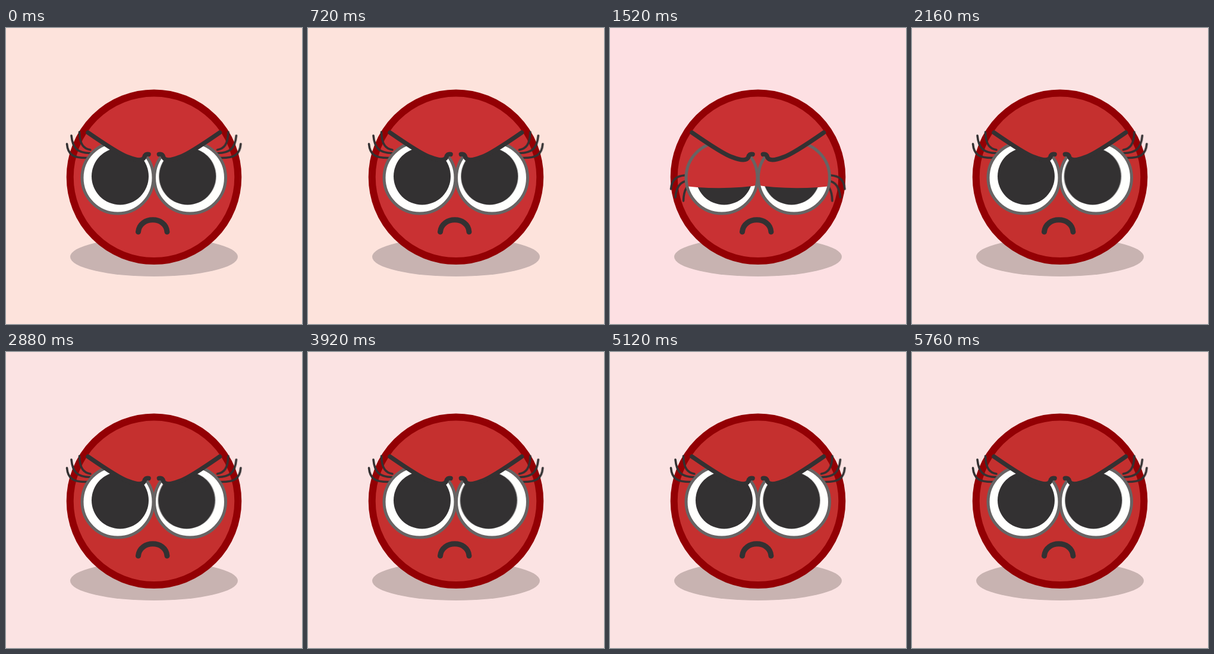
These frames come from a looping animation (498x498 px, 5840 ms). An HTML page without scripts:

```html
<!DOCTYPE html>
<html lang="en">
<head>
<meta charset="utf-8">
<title>Grumpy ball</title>
<style>
  html, body { margin: 0; width: 100%; height: 100%; overflow: hidden; }
  svg { display: block; width: 100vw; height: 100vh; }

  .bg, .skin, .lid, .lashes, .drift { animation: 5840ms step-end infinite; }
  .bg { animation-name: tint; }
  .skin { animation-name: skin; }
  .lid { animation-name: lid; }
  .lashes { animation-name: lashes; }
  .drift { animation-name: drift; }
  .line { fill: none; stroke: #333132; stroke-linecap: round; stroke-linejoin: round; }

  @keyframes tint {
    0% { fill: #fde3dc; }
    24.65%, 68.49% { fill: #fde0e3; }
    30.13%, 73.97%, 100% { fill: #fbe3e3; }
  }
  @keyframes skin {
    0% { fill: #c93133; }
    30.13%, 100% { fill: #c5302f; }
  }
  /* Two quick blinks: half way, down, half way, open. */
  @keyframes lid {
    0%, 30.13%, 73.97%, 100% { transform: translateY(-100px); }
    24.65%, 28.76%, 68.49%, 72.6% { transform: translateY(-45px); }
    26.02%, 69.86% { transform: translateY(0); }
  }
  @keyframes lashes {
    0%, 30.13%, 73.97%, 100% { transform: none; }
    24.65%, 28.76%, 68.49%, 72.6% { transform: translateY(180px) scaleY(.2); }
    26.02%, 69.86% { transform: translateY(466px) scaleY(-1); }
  }
  @keyframes drift {
    0%, 82%, 100% { transform: none; }
    30.13% { transform: translateX(1.5px); }
  }
</style>
</head>
<body>
<svg viewBox="0 0 498 498">
  <defs>
    <clipPath id="under-brow">
      <path d="M100 176H138Q190 212 205 217Q226 225 234 212H260V330H100Z"/>
    </clipPath>
    <clipPath id="eyeball"><circle cx="188" cy="252" r="60"/></clipPath>

    <g id="lash-set" class="line" stroke-width="3.6">
      <path d="M102.500 195C104 213 113 219 137 218.500"/>
      <path d="M110 181C112 203 121 210 141 210.500"/>
      <path d="M123.500 175C124 195 130 203 142 205"/>
    </g>
    <circle id="white" cx="188" cy="252" r="60" fill="#fffffd"/>
    <circle id="pupil" cx="192" cy="249.500" r="48" fill="#333132"/>
    <path id="lid" d="M110 60V264Q188 275 260 263V60Z"/>
    <circle id="rim" cx="188" cy="252" r="60" fill="none" stroke="#676464" stroke-width="5"/>
    <path id="brow" class="line" stroke-width="7.500" d="M138 176Q190 212 205 217Q228 226 232.500 218Q234 211 240 212.500"/>
  </defs>

  <rect class="bg" width="498" height="498"/>
  <ellipse cx="249" cy="385" rx="141" ry="33" fill="#c8b3b1"/>
  <circle class="skin" cx="249" cy="250.700" r="141.300" stroke="#930004" stroke-width="12"/>

  <g>
    <g class="lashes"><use href="#lash-set"/></g>
    <g clip-path="url(#under-brow)">
      <g clip-path="url(#eyeball)">
        <use href="#white"/>
        <use href="#pupil"/>
        <g class="lid"><use class="skin" href="#lid"/></g>
      </g>
      <use href="#rim"/>
    </g>
    <use href="#brow"/>
  </g>

  <g transform="matrix(-1 0 0 1 497.5 0)">
    <g class="lashes"><use href="#lash-set"/></g>
    <g clip-path="url(#under-brow)">
      <g clip-path="url(#eyeball)">
        <use href="#white"/>
        <g class="drift"><use href="#pupil"/></g>
        <g class="lid"><use class="skin" href="#lid"/></g>
      </g>
      <use href="#rim"/>
    </g>
    <use href="#brow"/>
  </g>

  <path class="line" stroke-width="9" d="M222.500 343C225 316 269 316 271 343"/>
</svg>
</body>
</html>
```
